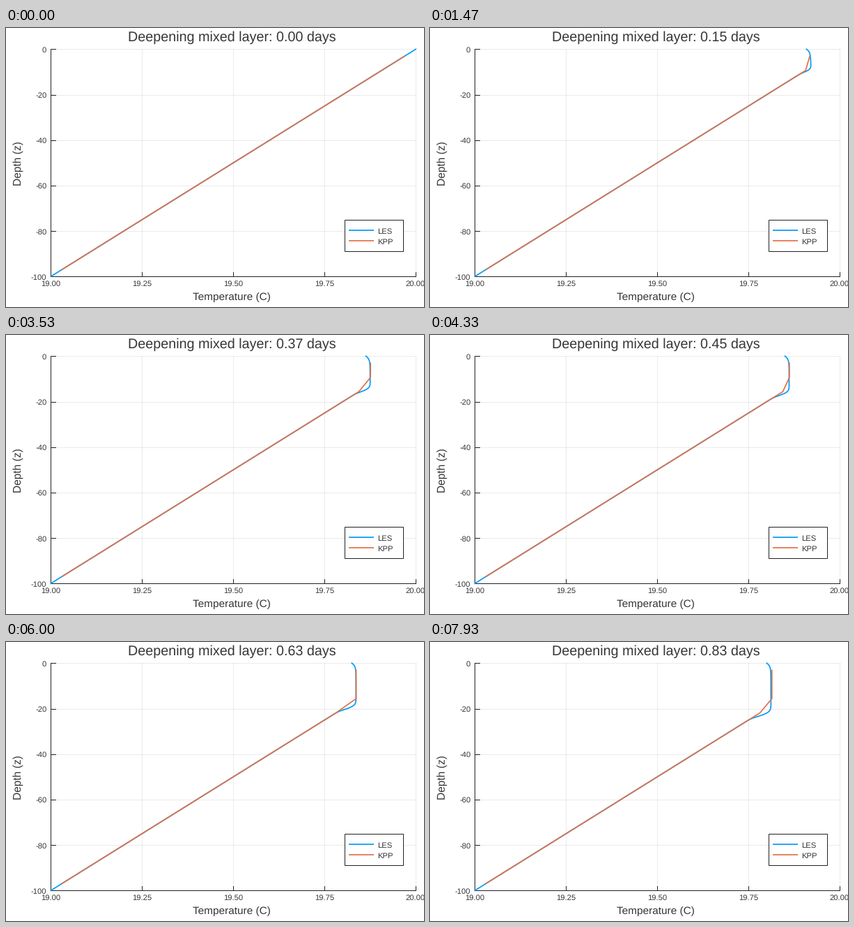
These frames come from a looping animation (600 px wide and 400 px high, 8000 ms). A matplotlib script:

```python
import numpy as np
import matplotlib.pyplot as plt
from matplotlib.animation import FuncAnimation
from matplotlib.patches import Rectangle

STEPS, LOOP_MS, TICK_MS = 120, 8000, 20
STEP_DAYS = 1 / 144            # ten minutes of model time per step
BLUE, ORANGE, INK, FRAME = "#009af9", "#e26f46", "#363636", "#222222"
LEFT, TOP, WIDTH, HEIGHT = 64.3, 30.3, 524, 326
PT = 0.72                      # points per pixel at 100 dpi

plt.rcParams.update({"font.family": "Liberation Sans", "text.hinting": "none"})
fig = plt.figure(figsize=(6, 4), dpi=100, facecolor="white")
ax = fig.add_axes([0, 0, 1, 1])
ax.set(xlim=(0, 600), ylim=(400, 0))
ax.axis("off")


def px(temp):
    return LEFT + WIDTH * (np.asarray(temp) - 19)


def py(depth):
    return TOP + HEIGHT * np.asarray(depth) / 100


def line(x, y, color=FRAME, width=1.0, **kw):
    return ax.plot(x, y, color=color, lw=width * PT, **kw)[0]


def label(x, y, text, size, ha="center", va="baseline", **kw):
    return ax.text(x, y, text, fontsize=size * PT, color=INK, ha=ha, va=va, **kw)


def les_profile(n):
    """Smooth profile: cool skin, mixed layer, entrainment zone, linear below."""
    root = np.sqrt(n)
    mixed = 20 - max(0, 0.0175 * root - 0.002)
    base = 20 - 0.01 * FINE
    depth, spread = 2.15 * root - 0.55, 0.8 + 0.04 * root
    weight = np.exp(-np.exp(np.minimum((FINE - depth) / spread, 6)))
    skin = 0.0115 * (1 - np.exp(-n / 3)) * np.exp(-FINE / 1.2)
    return base + weight * (mixed - base) - skin


def kpp_profile(n):
    """Coarse column cooled from the top with convective adjustment."""
    temp = 20 - 0.01 * COARSE
    loss = 0.00233 * n
    for k in range(1, len(temp)):
        mean = (temp[:k].sum() - loss) / k
        if mean >= temp[k]:
            break
    temp[:k] = mean
    return temp


FINE = np.linspace(0, 100, 401)
COARSE = (np.arange(16) + 0.5) * 6.25

# Grid, ticks and axes
for i in range(5):
    x = float(px(19 + i / 4))
    if i:
        line([x, x], [TOP, TOP + HEIGHT], "black", alpha=0.08)
    line([x, x], [TOP + HEIGHT, TOP + HEIGHT - 6])
    label(x - 0.5, 370, f"{19 + i / 4:.2f}", 11.2)
for d in range(0, 101, 20):
    y = float(py(d))
    if d < 100:
        line([LEFT, LEFT + WIDTH], [y, y], "black", alpha=0.08)
    line([LEFT, LEFT + 7], [y, y])
    label(58.3, y + 4.3, f"{-d}", 11.2, ha="right")
line([LEFT, LEFT], [TOP, TOP + HEIGHT])
line([LEFT, LEFT + WIDTH], [TOP + HEIGHT] * 2)

label(324, 389.5, "Temperature (C)", 15.4)
label(25, 193.7, "Depth (z)", 15.5, ha="right", va="center", rotation=90)
title = label(324.5, 19, "", 19.8)

les = line([], [], BLUE, 1.7)
kpp = line([], [], ORANGE, 1.7)

# Legend
ax.add_patch(Rectangle((486, 275), 84, 45, fc="white", ec=FRAME,
                       lw=PT, zorder=3))
for y, name, color in ((290, "LES", BLUE), (305, "KPP", ORANGE)):
    line([492, 528], [y, y], color, 1.7, zorder=4, solid_capstyle="butt")
    label(533, y + 4.7, name, 11.2, ha="left", zorder=4)


def draw(tick):
    # steps begin on times rounded to the tick
    n = int((tick * TICK_MS + 14) * STEPS / LOOP_MS) % STEPS
    title.set_text(f"Deepening mixed layer: {n * STEP_DAYS + 1e-6:.2f} days")
    les.set_data(px(les_profile(n)), py(FINE))
    kpp.set_data(px(kpp_profile(n)), py(COARSE))
    return title, les, kpp


anim = FuncAnimation(fig, draw, frames=LOOP_MS // TICK_MS, interval=TICK_MS,
                     repeat=True, repeat_delay=0, blit=False)
plt.show()
```
